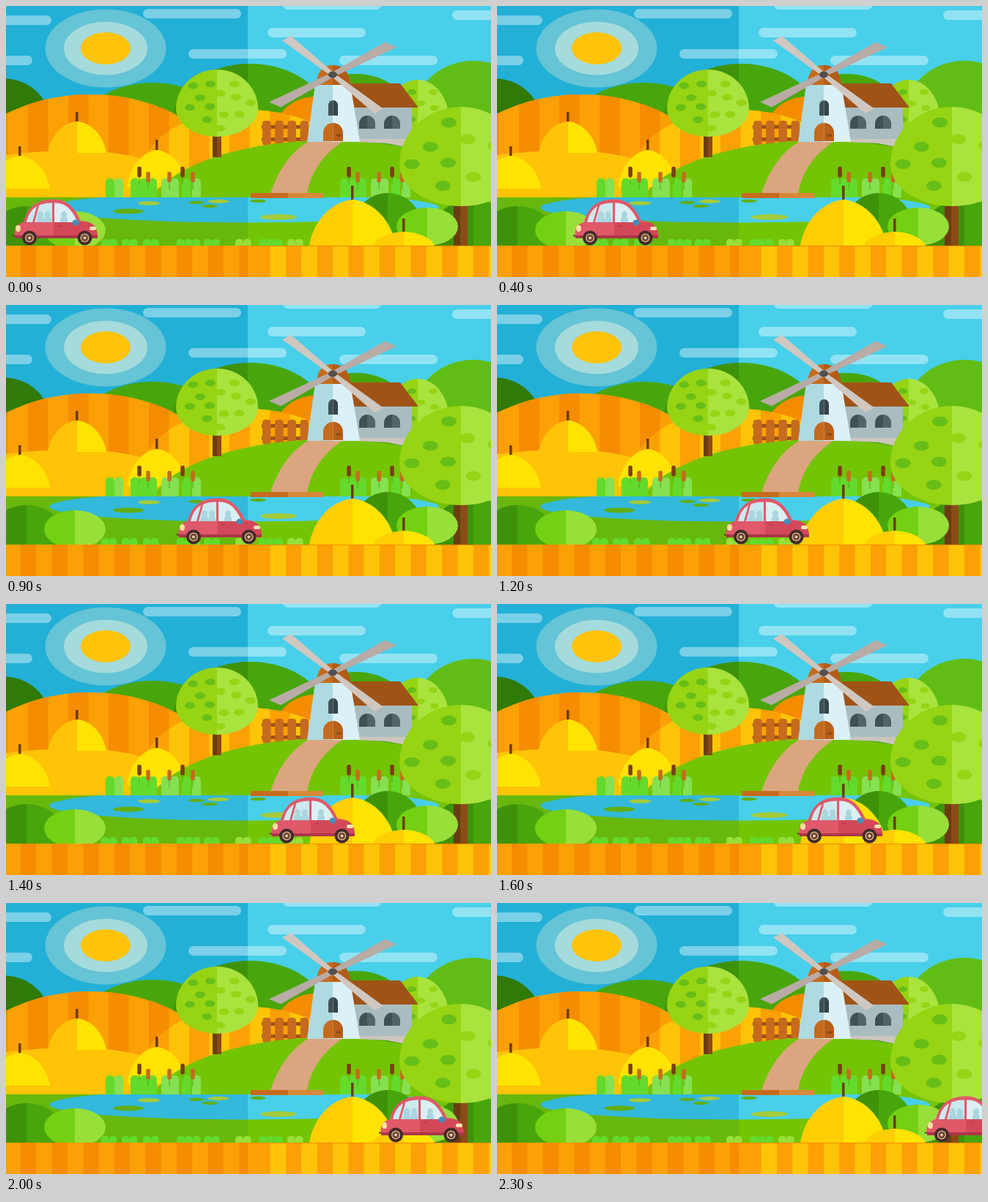
An HTML page with a canvas that plays this animation: 662 px wide and 371 px high, repeating every 2400 ms.

```html
<!DOCTYPE html>
<html lang="en">
<head>
<meta charset="utf-8">
<title>Country drive</title>
<style>
html, body { margin: 0; width: 100%; height: 100%; overflow: hidden; background: #22b0d7; }
canvas { display: block; width: 662px; height: 371px; }
</style>
</head>
<body>
<canvas id="stage" width="662" height="371"></canvas>
<script>
const W = 662, H = 371, MID = 330, SHORE = 262, ROAD = 328;
const screen = document.getElementById('stage').getContext('2d');
const scene = document.createElement('canvas');
scene.width = W;
scene.height = H;
let g = scene.getContext('2d');

const DARK = '#3e920a', GREEN = '#48a60c', LEAF = '#96d414', LIME = '#aae23e', MOSS = '#67be17';
const MINT = '#64da2c', SOFT = '#85e052', SPRING = '#74d012', PALE = '#98df3a', MEADOW = '#74c406';
const BARK = '#6d3b12', TRUNK = '#8b4b16', WOOD = '#c66b1d', ROOF = '#a05317', SLATE = '#405055';
const AMBER = '#ffc407', GOLD = '#ffce05', YELLOW = '#ffe303', ORANGE = '#fba105', RUST = '#f58c02';

function rect(x, y, w, h, color) {
  g.fillStyle = color;
  g.fillRect(x, y, w, h);
}
function pill(x, y, w, h, r, color) {
  g.fillStyle = color;
  g.beginPath();
  g.roundRect(x, y, w, h, r);
  g.fill();
}
function oval(x, y, rx, ry, color) {
  g.fillStyle = color;
  g.beginPath();
  g.ellipse(x, y, rx, ry, 0, 0, Math.PI * 2);
  g.fill();
}
function shape(d, color) {
  g.fillStyle = color;
  g.fill(new Path2D(d));
}
function clipped(path, draw) {
  g.save();
  g.clip(path);
  draw();
  g.restore();
}
function ovalPath(x, y, rx, ry) {
  const p = new Path2D();
  p.ellipse(x, y, rx, ry, 0, 0, Math.PI * 2);
  return p;
}
function split(path, x, left, right) {
  clipped(path, () => {
    rect(0, 0, x, H, left);
    rect(x, 0, W - x, H, right);
  });
}
function bush(x, y, rx, ry, left, right) {
  split(ovalPath(x, y, rx, ry), x, left, right);
}
// Every second stripe from x up to end
function stripes(x, end, width, color) {
  for (; x < end; x += 2 * width) rect(x, 0, Math.min(width, end - x), H, color);
}
function lumps(x, y, n, w, h, color) {
  for (let i = 0; i < n; i++) pill(x + i * w, y, w, h, [w * .42, w * .42, 0, 0], color);
}
function stack(x, top, base, r, left, poleTop) {
  const h = base - top;
  const side = s => `M${x} ${top} C${x + s * r * .54} ${top + h * .05} ${x + s * r * .92} ${top + h * .52} ${x + s * r} ${base} H${x} Z`;
  rect(x - 2, poleTop, 3.5, top - poleTop + 4, BARK);
  shape(side(-1), left);
  shape(side(1), YELLOW);
}
function arch(x, y, w, h, left, right) {
  const p = new Path2D();
  p.roundRect(x, y, w, h, [w / 2, w / 2, 0, 0]);
  split(p, x + w / 2, left, right);
}
// Egg-shaped crown with leaf spots spread along a spiral
function crown(x, top, rx, h, count, size) {
  const y = top + h * .58;
  const p = new Path2D();
  p.ellipse(x, y, rx, y - top, 0, Math.PI, 0);
  p.ellipse(x, y, rx, top + h - y, 0, 0, Math.PI);
  split(p, x, LEAF, LIME);
  for (let i = 0; i < count; i++) {
    const a = i * 2.4 + 2.6, r = .82 * Math.sqrt((i + .8) / count);
    const sx = x + Math.cos(a) * rx * r, sy = top + h * (.5 + .5 * r * Math.sin(a));
    oval(sx, sy, size, size * .65, sx < x ? MOSS : LEAF);
  }
}
function trunk(x, y, h, w) {
  rect(x - w / 2, y, w / 2, h, BARK);
  rect(x, y, w / 2, h, TRUNK);
}

function sky() {
  rect(0, 0, MID, H, '#22b0d7');
  rect(MID, 0, W - MID, H, '#48cfea');
  const clouds = [[-72, 13], [-98, 68], [187, 4], [249, 59], [378, -8], [357, 30], [455, 68], [609, 6]];
  for (const [x, y] of clouds) pill(x, y, 134, 13, 6.5, 'rgba(255,255,255,.4)');
  oval(136, 58, 82.5, 53.5, '#65c4d5');
  oval(136, 58, 57, 36.5, '#a5dbdc');
  oval(136, 58, 34, 22, '#ffc309');
}

function hills() {
  oval(-5, 155, 64, 56, '#307b08');
  oval(200, 171, 100, 66, GREEN);
  split(ovalPath(333, 154, 105, 75), MID, DARK, GREEN);
  oval(478, 160, 78, 67, GREEN);
  oval(638, 150, 82, 75, '#61bd15');
  crown(562, 101, 43, 97, 10, 6);

  clipped(ovalPath(115, 251, 190, 130), () => {
    rect(0, 0, MID, H, ORANGE);
    stripes(-25, MID, 27.5, RUST);
  });
  oval(422, 175, 56, 51, RUST);
  clipped(ovalPath(330, 230, 145, 88), () => {
    rect(0, 0, W, H, ORANGE);
    stripes(167.5, W, 27.5, AMBER);
  });
  shape('M0 204 Q55 197 100 198 Q195 198 270 246 V262 H0 Z', AMBER);
  stack(97, 158, 201, 40, AMBER, 145);
  stack(19, 205, 250, 41, YELLOW, 192);
  stack(206, 197, 248, 41, YELLOW, 183);
}

function meadow() {
  rect(349, 163, 63, 5, ROOF);
  rect(349, 180, 63, 5, ROOF);
  for (let i = 0; i < 4; i++) pill(350 + i * 17.2, 157, 11.5, 34, 4, WOOD);
  clipped(ovalPath(440, 290, 250, 106), () => rect(0, 0, W, SHORE, MEADOW));
  trunk(288, 172, 35, 12);
  crown(288, 87, 56, 92, 13, 7);
  shape('M412 186 C388 200 370 228 361 257 H411 C416 225 435 202 460 185 Z', '#dba67f');
}

function blades(x, y) {
  const pair = (dx, dy, wx, wy, color) => {
    for (const s of [-1, 1]) {
      const nx = x + s * dx * .05, ny = y + s * dy * .05, tx = x + s * dx, ty = y + s * dy;
      shape(`M${nx - wx * .5} ${ny - wy * .5} L${tx - wx} ${ty - wy} L${tx + wx} ${ty + wy} L${nx + wx * .5} ${ny + wy * .5} Z`, color);
    }
  };
  pair(79, -41, 8, 3.6, '#b9aba5');
  pair(63, 50, 6, -3.2, '#cfc7c0');
  oval(x, y, 6, 4.5, '#51504f');
}

function mill() {
  rect(465, 137, 89, 46, '#a9bdc0');
  shape('M470 182 H555 V195 L520 188 L478 186 Z', '#ccc5be');
  shape('M465 106 H538 L563 139 H465 Z', ROOF);
  for (const x of [482, 516]) arch(x, 150, 22, 18, SLATE, '#536469');

  shape('M422 107 H446 V186 H411 Z', '#afdae2');
  shape('M446 107 H470 L483 186 H446 Z', '#dcf0f7');
  shape('M424 108 C424 90 433 81 446 81 V108 Z', WOOD);
  shape('M446 81 C460 81 469 90 470 108 H446 Z', '#b15d18');
  arch(440, 129, 13, 21, SLATE, '#33444a');
  arch(433, 160, 27, 25, WOOD, '#b85f19');
  oval(454, 177, 3.5, 1.8, TRUNK);
  blades(446, 94);
}

function reeds(x) {
  const foot = SHORE - 26;
  lumps(x, foot, 3, 12, 26, MINT);
  lumps(x + 42, foot, 2, 12, 26, SOFT);
  lumps(x + 70, foot, 1, 12, 26, MINT);
  lumps(x + 84, foot, 1, 12, 26, SOFT);
  [12, 24, 53, 71, 85].forEach((dx, i) => {
    const dark = i % 3 === 0, y = dark ? 220 : 227;
    rect(x + dx - .5, y + 12, 1, 12, '#4cae17');
    pill(x + dx - 2.7, y, 5.5, 14.5, 2, dark ? '#793d12' : WOOD);
  });
}

function bank() {
  lumps(136, SHORE - 26, 1, 12, 26, MINT);
  lumps(148, SHORE - 26, 1, 12, 26, SOFT);
  reeds(170);
  reeds(456);
}

function pond() {
  rect(0, SHORE, MID, ROAD - SHORE, '#67b70d');
  rect(MID, SHORE, W - MID, ROAD - SHORE, MEADOW);
  clipped(ovalPath(325, 276, 266, 20.5), () => {
    rect(0, SHORE, MID, 40, '#33b9db');
    rect(MID, SHORE, W - MID, 40, '#48cfea');
  });
  const pads = [[195, 270, 15], [290, 267.5, 14.5], [372, 289, 25], [167, 281, 21], [260, 269, 11], [278, 274, 11], [344, 267, 11]];
  pads.forEach(([x, y, r], i) => oval(x, y, r, r * .12 + .9, i < 3 ? '#a5cb3b' : '#60ae10'));
  rect(334, 256, 51, 7, WOOD);
  rect(385, 256, 48, 7, '#d88839');
}

function verge() {
  bush(28, 318, 52, 44, DARK, GREEN);
  bush(94, 307, 42, 26, SPRING, PALE);
  [130, 158, 187, 233, 270, 313, 345, 384].forEach((x, i) =>
    lumps(x, 319, i % 3 || !i ? 2 : 3, 10.8, 9, i === 5 || i === 7 ? PALE : MINT));

  bush(638, 322, 62, 57, DARK, GREEN);
  bush(521, 306, 48, 50, DARK, GREEN);
  trunk(620.5, SHORE, ROAD - SHORE, 19);
  crown(621, 138, 84, 136, 9, 10.5);
  bush(575, 302, 42, 26, SPRING, PALE);
  stack(473, 265, ROAD, 59, GOLD, 246);
  stack(543, 309, ROAD, 42, GOLD, 291);
}

function road() {
  const width = 21.3, first = 20;
  const p = new Path2D();
  p.rect(0, ROAD, W, H - ROAD);
  clipped(p, () => {
    rect(0, 0, W, H, ORANGE);
    stripes(first, MID, width, RUST);
    stripes(first + 16 * width, W, width, AMBER);
    rect(MID, ROAD, W - MID, 1, RUST);
  });
}

function wheel(x) {
  oval(x, 317.5, 10, 10, '#442a2b');
  oval(x, 317.5, 6, 6, '#d9b584');
  oval(x, 317.5, 4.5, 4.5, '#69413a');
  oval(x, 317.5, 2, 2, '#e6cda0');
}

// Local origin: centre of the rear wheel
function car(x) {
  g.save();
  g.translate(x, 0);
  rect(-23, 313.5, 10, 2, '#63343b');
  shape('M-20 317 C-22 305 -17 298 -8 296 C-3 276 9 265 32 264.5 C52 264 62 277 70 294 C84 295 93 299 93 317 Z', '#df5969');
  shape('M33 296 H70 C84 295 93 299 93 317 H33 Z', '#d34858');
  shape('M-4 296 C0 279 9 270 31 269.5 V296 Z', '#cce9ef');
  shape('M34 269.5 C51 269 59 281 66 296 H34 Z', '#dceff3');
  shape('M11 271 L14 270 L7 296 H4 Z', '#df5969');
  const rider = '#a9d6df';
  for (const px of [15, 25, 47]) {
    oval(px, 286, 4, 5, rider);
    pill(px - 5, 289, 10, 7, [4, 4, 0, 0], rider);
  }
  oval(63, 296.5, 4.5, 4, '#438fb8');
  rect(38, 300, 6, 1.5, '#b83b4d');
  oval(-15.5, 304.5, 3.5, 4.5, '#f6dfa0');
  pill(82, 302, 9, 5, 2.5, '#f6e5b2');
  rect(-20, 314, 113, 4, '#ac3548');
  wheel(0);
  wheel(75.5);
  g.restore();
}

[sky, hills, meadow, mill, bank, pond, verge, road].forEach(draw => draw());
g = screen;

const LOOP = 2400, STEP = 100;
const drive = [[0, 32], [400, 127], [1200, 333], [LOOP, 632]];

function position(t) {
  const i = drive.findIndex(([end]) => end > t);
  const [t0, x0] = drive[i - 1], [t1, x1] = drive[i];
  return Math.round(x0 + (x1 - x0) * (t - t0) / (t1 - t0));
}

const start = performance.now();
function frame() {
  const t = Math.floor((performance.now() - start) % LOOP / STEP) * STEP;
  g.drawImage(scene, 0, 0);
  car(position(t));
  requestAnimationFrame(frame);
}
frame();
</script>
</body>
</html>
```
